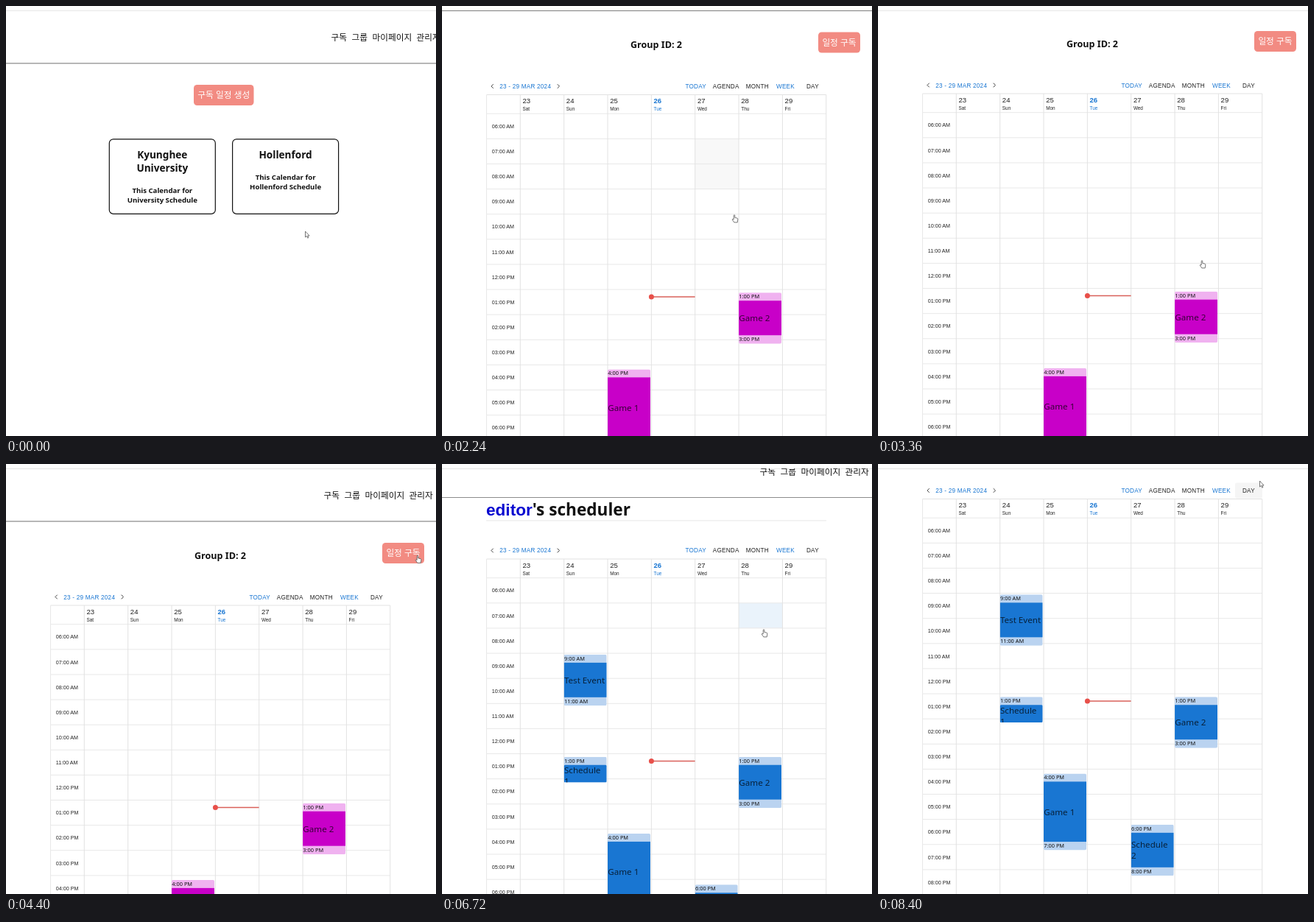
Animation of 584x584 px, one loop 8480 ms. Source, as an HTML page:

```html
<!DOCTYPE html>
<html lang="ko">
<head>
<meta charset="utf-8">
<title>Calendar walkthrough</title>
<style>
  html, body { margin: 0; width: 100%; height: 100%; overflow: hidden; background: #fff; }
  svg { display: block; }
  text { font-family: "Noto Sans", "Open Sans", sans-serif; fill: #111; white-space: pre; }
  .kr { font: 11.68px "Noto Sans CJK KR", "Noto Sans CJK", "Noto Sans KR", sans-serif; }
  .btn { font-weight: 500; fill: #fff; text-anchor: middle; }
  .mid { font-weight: 700; text-anchor: middle; }
  .ui { font-family: "Liberation Sans", Arial, sans-serif; fill: #222; }
  .bar { font-size: 8.15px; letter-spacing: .03em; }
  .blue { fill: #1976d2; }
  .time { font-size: 7.4px; }
  .name { font-size: 11.6px; fill: rgba(0, 0, 0, .72); }
</style>
</head>
<body>
<svg id="stage" width="584" height="584" viewBox="0 0 584 584"></svg>
<script>
const LOOP = 8480, STEP = 80;
const ROW = 34.12, EVENT_ROW = 34.72, COL = 59.35, LEFT = 106.3, HEAD = 37.2;

const rect = (x, y, w, h, fill, more = '') =>
  `<rect x="${x}" y="${y}" width="${w}" height="${h}" fill="${fill}" ${more}/>`;
const line = (x1, y1, x2, y2, color, w = 1) =>
  `<path d="M${x1} ${y1}L${x2} ${y2}" stroke="${color}" stroke-width="${w}"/>`;
const text = (x, y, s, cls, size) =>
  `<text x="${x}" y="${y}" class="${cls}" ${size ? `style="font-size:${size}px"` : ''}>${s}</text>`;
const group = (id, body, y = 0) => `<g id="${id}" transform="translate(0 ${y})">${body}</g>`;

const hourLabel = h => `${(h + 11) % 12 + 1}:00 ${h < 12 ? 'AM' : 'PM'}`;
const button = (x, w, s) =>
  rect(x, 107, w, 28, '#f28b82', 'rx="4.5"') + text(x + w / 2, 125.3, s, 'kr btn');

function card(x, title, lines) {
  let y = 207, body = rect(x, 180.8, 144, 101.6, '#fff', 'rx="5.5" stroke="#111" stroke-width="1.2"');
  for (const s of title) { body += text(x + 72, y, s, 'mid', 13.6); y += 18.2; }
  y += 10.6;
  for (const s of lines) { body += text(x + 72, y, s, 'mid', 9.65); y += 13.2; }
  return body;
}

function booking([day, from, to, ...names], main, pale) {
  const h = (to - from) * EVENT_ROW, long = to - from > 1, bottom = long ? h - 11.5 : h;
  const middle = long ? h / 2 + 4.2 : 22.5;
  const first = long ? middle - (names.length - 1) * 7.5 : middle;
  return `<svg x="${LEFT + COL * day}" y="${HEAD + (from - 6) * EVENT_ROW}" width="58" height="${h}">` +
    rect(0, 0, 58, h, pale, 'rx="2.2"') +
    rect(0, 11, 58, bottom - 11, main, long ? '' : 'rx="1.5"') +
    text(.3, 8, hourLabel(from), 'time') +
    (long ? text(.3, h - 3.6, hourLabel(to), 'time') : '') +
    names.map((s, i) => text(.3, first + i * 15, s, 'name')).join('') + '</svg>';
}

function calendar(id, y, under, events, main, pale) {
  let body = under;
  const bar = (x, s, blue = '') => { body += text(x, 3, s, 'ui bar ' + blue); };
  bar(78.3, '23 - 29 MAR 2024', 'blue');
  bar(330.5, 'TODAY', 'blue');
  bar(367.8, 'AGENDA');
  bar(412.8, 'MONTH');
  bar(454, 'WEEK', 'blue');
  bar(495, 'DAY');
  body += '<path d="M69.7-2.8l-2.8 2.8 2.8 2.8M156.7-2.8l2.8 2.8-2.8 2.8" fill="none" stroke="#444"/>';

  body += line(60.5, 11.5, 521.7, 11.5, '#e2e2e2') + line(60.5, 11.5, 60.5, 660, '#e8e8e8');
  for (let i = 0; i < 18; i++) {
    const top = HEAD + i * ROW;
    body += line(60.5, top, 521.7, top, '#e8e8e8') +
      text(67.8, top + ROW / 2 + 2.7, hourLabel(i + 6).padStart(8, '0'), 'ui', 7.15);
  }
  ['Sat', 'Sun', 'Mon', 'Tue', 'Wed', 'Thu', 'Fri', ''].forEach((day, i) => {
    const x = LEFT + COL * i;
    body += line(x, 11.5, x, 660, '#e2e2e2');
    if (!day) return;
    const cls = i === 3 ? 'ui blue' : 'ui';
    body += `<g ${i === 3 ? 'font-weight="700"' : ''}>${text(x + 3.2, 23.3, 23 + i, cls, 9.5)}</g>` +
      text(x + 3.2, 33.4, day, cls, 6.4);
  });
  for (const e of events) body += booking(e, main, pale);
  body += line(284.4, 286, 343.6, 286, '#d9605a', 1.3) + '<circle cx="284.4" cy="286" r="3.5" fill="#e8504a"/>';
  return group(id, body, y);
}

const cell = (id, day, row, rows, color) =>
  rect(LEFT + COL * day, HEAD + row * ROW, COL, ROW * rows, color, `id="${id}"`);

const games = [[5, 13, 15, 'Game 2'], [2, 16, 19, 'Game 1']];
const plans = [[1, 9, 11, 'Test Event'], [1, 13, 14, 'Schedule', '1'], [4, 18, 20, 'Schedule', '2']];
const nav = [[442, '구독'], [470, '그룹'], [498, '마이페이지'], [558, '관리자']];

document.getElementById('stage').innerHTML =
  rect(0, 0, 584, 584, '#fff') +
  group('page',
    group('nav', nav.map(([x, s]) => text(x - .5, 47.3, s, 'kr')).join('')) +
    line(0, 77.9, 584, 77.9, '#8c8c8c', 1.1) +
    group('list',
      button(255, 81.5, '구독 일정 생성') +
      card(140.3, ['Kyunghee', 'University'], ['This Calendar for', 'University Schedule']) +
      card(307.6, ['Hollenford'], ['This Calendar for', 'Hollenford Schedule'])) +
    group('team',
      text(291, 128.6, 'Group ID: 2', 'mid', 12.55) + button(511, 57, '일정 구독') +
      calendar('teamCal', 180.5, cell('greyCell', 4, 1, 2, '#f8f8f8'), games, '#c800c8', '#f0b2f0')) +
    group('mine',
      `<text x="60" y="102" font-weight="700" font-size="22.6"><tspan class="ui" style="fill:#0808d0">editor</tspan>'s scheduler</text>` +
      line(60, 109.3, 522, 109.3, '#e6e6e6') +
      calendar('myCal', 149.9,
        cell('blueCell', 5, 1, 1, '#eaf3fb') + rect(485, -10.5, 37, 21, '#f5f5f5', 'id="dayHover" rx="2"'),
        [...games, ...plans], '#1976d2', '#bad3f0'))) +
  rect(0, 0, 584, 6, '#fff') + line(0, 6.4, 584, 6.4, 'rgba(0,0,0,.1)') +
  `<g id="cursor" fill="#fff" stroke="#555" stroke-width=".8" stroke-linejoin="round">
    <path id="arrow" d="M0 0V8L1.9 6.4 3.2 9.2 4.4 8.6 3.2 6H5.6Z"/>
    <path id="hand" d="M-.8.8Q0-.6.8.8V4L4 4.6Q5 5 4.8 6.4L4.2 10.4H-.2L-2.8 6.6Q-2.8 5.2-.8 6.4Z"/>
  </g>`;

const $ = id => document.getElementById(id);

// keys: [time, value, value...]
function track(keys, t, ease = p => p) {
  const i = keys.findIndex(k => k[0] > t);
  if (i < 0) return keys[keys.length - 1].slice(1);
  const a = keys[i - 1], b = keys[i], p = ease((t - a[0]) / (b[0] - a[0]));
  return a.slice(1).map((v, n) => v + (b[n + 1] - v) * p);
}
const smooth = p => p * p * (3 - 2 * p);

const scrollKeys = [[0, 0], [2080, 0], [2160, 48], [2240, 71.5], [2320, 73], [3600, 73], [3680, 25],
  [3760, 3], [3840, 0], [6640, 0], [6720, 32.4], [6800, 64], [6880, 73], [6960, 105], [7040, 113.9]];
const cursorKeys = [[0, 406.5, 306], [80, 406.5, 306], [160, 411, 305.5], [320, 411, 305.5],
  [400, 412.5, 305.5], [560, 412.5, 305.5], [1040, 407.2, 242.5], [1440, 407.2, 242.5],
  [2240, 397, 283.5], [2480, 397, 283.5], [3360, 440, 345.5], [3600, 440, 345.5], [4320, 559, 124],
  [4560, 559, 124], [4880, 515, 44], [5360, 515, 44], [6160, 437, 224.5], [7520, 437, 224.5],
  [8080, 503, 38], [8240, 503, 38], [8400, 518.5, 23]];

function show(id, on) { $(id).setAttribute('display', on ? 'inline' : 'none'); }
function move(id, x, y) { $(id).setAttribute('transform', `translate(${x} ${y})`); }

function draw(now) {
  const t = Math.floor(now % LOOP / STEP) * STEP;
  const within = (a, b) => t >= a && t < b;
  const [x, y] = track(cursorKeys, t, smooth);
  const pointer = y < 282 && t < 1440 || within(1440, 8320);

  move('page', 0, -track(scrollKeys, t)[0]);
  move('nav', t < 1360 ? 0 : -10, 0);
  move('cursor', x, y);
  show('list', t < 1360);
  show('team', within(1360, 5280));
  show('teamCal', t >= 1440);
  show('mine', t >= 5280);
  show('greyCell', within(2000, 2400));
  show('blueCell', within(6080, 6880));
  show('dayHover', t >= 8080);
  show('hand', pointer);
  show('arrow', !pointer);
}

const start = performance.now();
function tick() {
  draw(performance.now() - start);
  requestAnimationFrame(tick);
}
tick();
</script>
</body>
</html>
```
